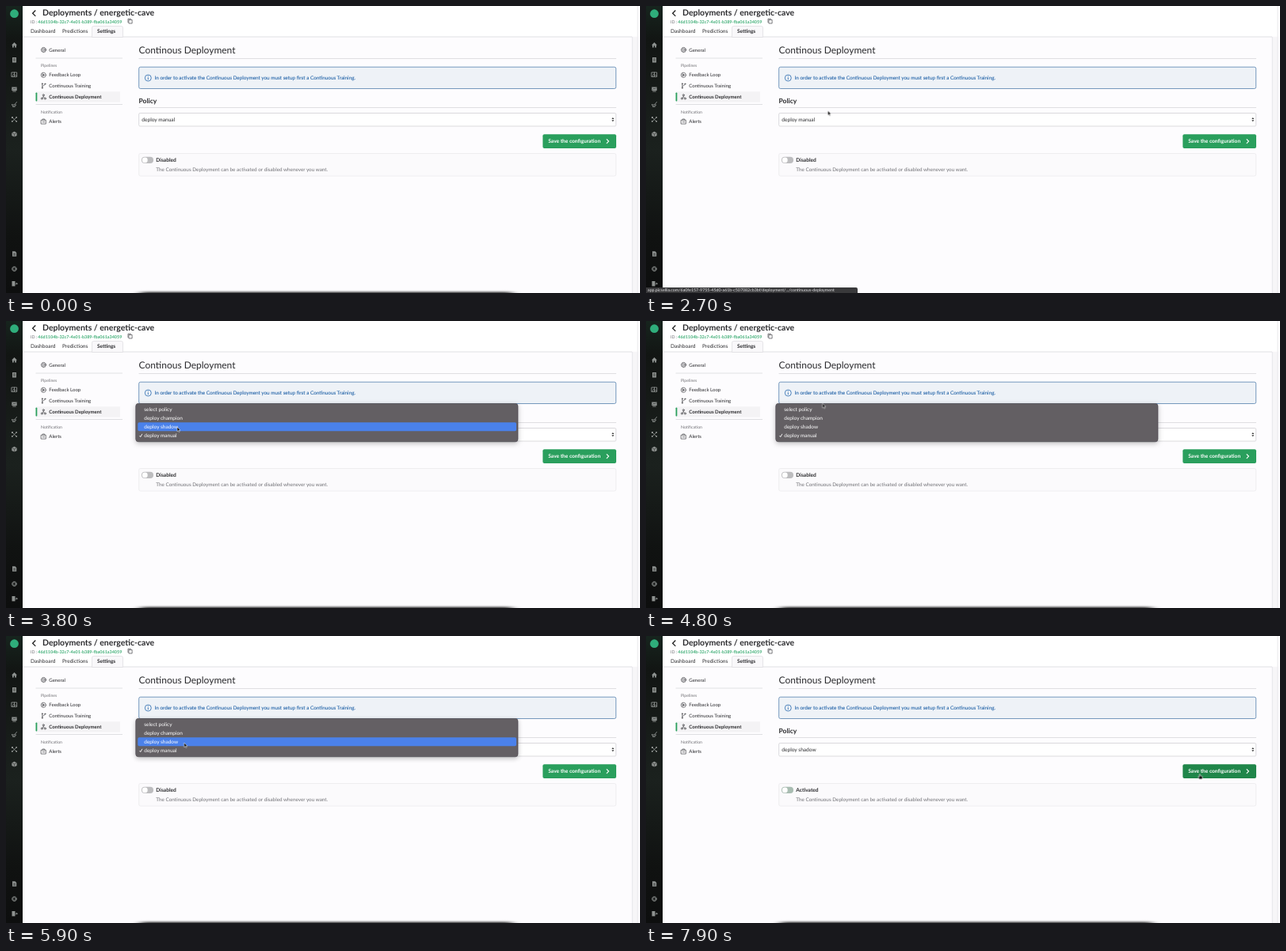
Animation, 800 px wide and 363 px high, one loop 8 s. Source, as an HTML page:

```html
<!DOCTYPE html>
<html lang="en">
<head>
<meta charset="utf-8">
<title>Deployment settings</title>
<style>
html, body { margin: 0; width: 100%; height: 100%; overflow: hidden; background: #fdfcfe; }
svg { display: block; width: 800px; height: 363px; }
text { font-family: Lato, "Open Sans", sans-serif; fill: #2b2b2e; text-rendering: geometricPrecision; white-space: pre; }
.b { font-weight: 700; }
.soft { fill: #707075; }
.rule { stroke: #d9d8db; stroke-width: .8; }
.ico { fill: none; stroke: #5c5c60; stroke-width: .8; stroke-linecap: round; stroke-linejoin: round; }
.side .ico { stroke: #8d918f; stroke-width: .9; }
.side .fill { fill: #8d918f; }
.anim { animation: 8s step-end infinite; }

#cursor { animation: move 8s linear infinite; }
#arrow { animation-name: arrow; }
#hand { animation-name: hand; }
#status { animation-name: status; }
#dock { animation-name: dock; }
#menu { animation: menu 8s linear infinite; }
#pick { animation-name: pick; }
#manual { animation-name: before; }
#shadow { animation-name: after; }
#button { animation-name: hover; }
#off { animation-name: off; }
#on { animation-name: on; }
#track { animation-name: track; }

@keyframes move {
  0%, 6.25% { transform: translate(236px, 176px); }
  10% { transform: translate(200px, 130px); }
  13.75%, 17.5% { transform: translate(159px, 104px); }
  25%, 27.5% { transform: translate(122px, 114px); }
  30% { transform: translate(165px, 119px); }
  33.75% { transform: translate(229.5px, 132.5px); }
  37.5% { transform: translate(218px, 141px); }
  40%, 45% { transform: translate(216px, 143px); }
  47.5%, 50% { transform: translate(216px, 134px); }
  52.5%, 55% { transform: translate(217px, 124px); }
  60%, 62% { transform: translate(222.7px, 104.3px); }
  65% { transform: translate(224px, 121px); }
  67.5%, 80% { transform: translate(224.7px, 135px); }
  85% { transform: translate(440px, 155px); }
  90% { transform: translate(697px, 187px); }
  91.25% { transform: translate(698px, 178px); }
  93%, 100% { transform: translate(698.7px, 174.5px); }
}
@keyframes arrow { 0% { opacity: 0; } 6.25% { opacity: 1; } 91.25%, 100% { opacity: 0; } }
@keyframes hand { 0% { opacity: 0; } 91.25%, 100% { opacity: 1; } }
@keyframes status { 0% { opacity: 0; } 27.5% { opacity: 1; } 36.25%, 100% { opacity: 0; } }
@keyframes dock { 0% { opacity: 1; } 27.5% { opacity: 0; } 36.25%, 100% { opacity: 1; } }
@keyframes menu {
  0%, 39.99% { opacity: 0; }
  40%, 73.75% { opacity: 1; }
  75% { opacity: .45; }
  76.25% { opacity: .02; }
  77.5%, 100% { opacity: 0; }
}
@keyframes pick {
  0% { transform: translateY(33px); opacity: 1; }
  46.25% { transform: translateY(22px); opacity: 1; }
  51.25% { transform: translateY(11px); opacity: 1; }
  55% { transform: none; opacity: 1; }
  58.75% { transform: none; opacity: 0; }
  63.75% { transform: none; opacity: 1; }
  65% { transform: translateY(11px); opacity: 1; }
  66.25% { transform: translateY(22px); opacity: 1; }
  72.5% { transform: translateY(22px); opacity: 0; }
  73.75%, 100% { transform: translateY(22px); opacity: 1; }
}
@keyframes before { 0% { opacity: 1; } 77.5%, 100% { opacity: 0; } }
@keyframes after { 0% { opacity: 0; } 77.5%, 100% { opacity: 1; } }
@keyframes hover { 0% { fill: #2a9f5d; } 91.25%, 100% { fill: #20864a; } }
@keyframes off { 0% { opacity: 1; } 98.75%, 100% { opacity: 0; } }
@keyframes on { 0% { opacity: 0; } 98.75%, 100% { opacity: 1; } }
@keyframes track { 0% { fill: #bdbdbf; } 98.75%, 100% { fill: #a9bdb2; } }
</style>
</head>
<body>
<svg viewBox="0 0 800 363">
  <defs>
    <linearGradient id="dark" x2="0" y2="1">
      <stop offset="0" stop-color="#17241e"/>
      <stop offset=".12" stop-color="#121513"/>
      <stop offset=".5" stop-color="#1b211e"/>
      <stop offset=".8" stop-color="#101211"/>
      <stop offset="1" stop-color="#0d0e0e"/>
    </linearGradient>
    <filter id="blur" x="-10%" y="-200%" width="120%" height="500%"><feGaussianBlur stdDeviation="6 1.6"/></filter>
    <filter id="drop" x="-5%" y="-30%" width="110%" height="170%"><feDropShadow dx="0" dy="2" stdDeviation="3" flood-opacity=".25"/></filter>
  </defs>

  <rect width="800" height="363" fill="#fdfcfe"/>
  <rect x="21" width="779" height="38.5" fill="#fff"/>
  <path class="rule" d="M21 39H790"/>
  <rect x="790" y="39" width="7" height="324" fill="#f7f6f8"/>
  <path d="M790.3 39V363M797 0V363" stroke="#e4e3e6" stroke-width=".8"/>

  <!-- dark side bar -->
  <g class="side">
    <rect width="21" height="363" fill="url(#dark)"/>
    <circle cx="10.5" cy="9.7" r="5.4" fill="#2fae7b"/>
    <path class="fill" d="M7 49.4L10.5 46l3.5 3.4h-1V52.600h-1.800V50.300H9.800v2.300H8v-3.200z"/>
    <path class="fill" d="M8 65h5v6.500H8z"/>
    <path d="M9 67h3M9 69h3" stroke="#1a1d1b" stroke-width=".7"/>
    <path class="ico" d="M7.300 84h6.400v5.500H7.300zM8 88.500l1.700-2 1.500 1.500 1-1 1.300 1.500M10.500 84v5"/>
    <path class="fill" d="M7.300 102.500h6.400v4.500H7.300zM8.300 107.500h4.400v1H8.300z"/>
    <path d="M8.500 105.500l1.500-1.300 1.200.9 1.500-1.500" fill="none" stroke="#1a1d1b" stroke-width=".6"/>
    <path class="ico" d="M13.500 121.500l-2.500 3M7.500 124.500c0 3 4 4 5 1M8 125h4.500M8.500 127.300h2.500"/>
    <path class="ico" d="M8 141l5 5M13 141l-5 5"/>
    <path class="fill" d="M7 140h2v2H7zM12.300 140h1.700v1.700h-1.700zM7 145h1.700v1.700H7zM12.300 145h1.700v1.700h-1.700z"/>
    <path class="fill" d="M10.500 158.800l3.200 1.600v3.600l-3.200 1.600-3.200-1.600v-3.600z"/>
    <path d="M7.500 160.500l3 1.500 3-1.500M10.500 162v3.500" fill="none" stroke="#1a1d1b" stroke-width=".5"/>
    <path class="fill" d="M8 310.300h3.500l1.700 1.700v4.700H8z"/>
    <path d="M9.200 313.300h2.800M9.200 315h2.800" stroke="#111" stroke-width=".6"/>
    <circle class="ico" cx="10.500" cy="332.500" r="1.900"/>
    <circle class="ico" cx="10.500" cy="332.500" r="2.900" stroke-dasharray="1.300 .98"/>
    <path class="fill" d="M7.500 348h4v6.400h-4z"/>
    <path class="ico" d="M12 351.200h2.200m-1-1l1 1-1 1"/>
  </g>

  <!-- header -->
  <path d="M37.300 5.500l-3.700 3.700 3.700 3.700" fill="none" stroke="#222" stroke-width="1.300"/>
  <text class="b" x="46" y="12" font-size="10.500">Deployments / energetic-cave</text>
  <text class="soft" x="31" y="21.500" font-size="5.300">ID :</text>
  <text class="b" x="40.300" y="21.500" font-size="5.450" style="fill:#3fae76">46d1104b-32c7-4e01-b389-fba061a34059</text>
  <path class="ico" d="M155.300 17.500h3.800v4.500h-3.800zM154 20.700v-4.500h3.500" stroke-width=".6"/>
  <path d="M108.500 39.500V27.500q0-2 2-2h35q2 0 2 2v12z" fill="#f9f8fa" stroke="#dddce0" stroke-width=".7"/>
  <g font-size="6.600">
    <text x="31" y="34">Dashboard</text>
    <text x="71" y="34">Predictions</text>
    <text class="b" x="115" y="34" font-size="6.500">Settings</text>
  </g>

  <!-- settings list -->
  <path class="rule" d="M37.500 66H147M37.500 124.500H147"/>
  <rect x="38" y="108.300" width="106" height="13.300" fill="#f4f3f5"/>
  <rect x="37.500" y="109.500" width="1.800" height="11" rx=".7" fill="#2a9f5d"/>
  <g class="ico">
    <circle cx="47.500" cy="55.500" r="1.100"/>
    <circle cx="47.500" cy="55.500" r="2.700"/>
    <circle cx="47.500" cy="55.500" r="3.200" stroke-dasharray="1 1.510" stroke-width=".6"/>
    <circle cx="47.300" cy="87.300" r="3.100"/>
    <path d="M46.500 86l2.200 1.300-2.200 1.300z" fill="#5c5c60"/>
    <path d="M45.800 98.500v5M49.300 99c0 2-3.500 1-3.500 3"/>
    <circle cx="45.800" cy="98.300" r=".6"/><circle cx="49.300" cy="98.500" r=".6"/><circle cx="45.800" cy="103.700" r=".6"/>
    <path d="M47.300 113v2l-2 2M47.300 115l2 2"/>
    <circle cx="47.300" cy="112.700" r="1.100"/><circle cx="45.300" cy="117" r="1.100"/><circle cx="49.300" cy="117" r="1.100"/>
    <path d="M44.500 144.300h5.800v4.800h-5.800zM46 144v-1h2.800v1M46.200 146.700h2.500"/>
  </g>
  <g font-size="6.050">
    <text x="54.300" y="57.600">General</text>
    <text x="54.300" y="89.300">Feedback Loop</text>
    <text x="54.300" y="103">Continuous Training</text>
    <text class="b" x="54.300" y="116.800" font-size="6.100">Continuous Deployment</text>
    <text x="54.300" y="148.300">Alerts</text>
  </g>
  <g font-size="5.200">
    <text class="soft" x="44" y="76.500">Pipelines</text>
    <text class="soft" x="44" y="136">Notification</text>
  </g>

  <!-- main form -->
  <text x="167.500" y="59.700" font-size="12">Continous Deployment</text>
  <path class="rule" d="M167.500 66.500H770M167.500 128.500H770"/>
  <rect x="167.700" y="77.200" width="602" height="27.300" rx="2" fill="#eef2f7" stroke="#5580ae" stroke-width=".8"/>
  <circle cx="179.300" cy="91" r="4" fill="none" stroke="#2d6cb0" stroke-width=".8"/>
  <path d="M179.300 90.300v2.900M179.300 88.300v.9" stroke="#2d6cb0" stroke-width=".9"/>
  <text x="187.500" y="92.900" font-size="6.350" style="fill:#2565a9;stroke:#2565a9;stroke-width:.1">In order to activate the Continuous Deployment you must setup first a Continuous Training.</text>
  <text class="b" x="167.500" y="122.500" font-size="8.500">Policy</text>
  <rect x="167.700" y="135.500" width="602" height="16.500" rx="1.500" fill="#fff" stroke="#d2d1d5" stroke-width=".8"/>
  <path d="M764.300 143.100l1.500-2 1.500 2zM764.300 144.300l1.500 2 1.500-2z" fill="#333"/>
  <text class="anim" id="manual" x="171.300" y="146" font-size="6.600">deploy manual</text>
  <text class="anim" id="shadow" x="171.300" y="146" font-size="6.600">deploy shadow</text>
  <rect class="anim" id="button" x="677.300" y="162.300" width="92.700" height="17.700" rx="2" fill="#2a9f5d"/>
  <text class="b" x="684.300" y="173.300" font-size="6.600" style="fill:#fff">Save the configuration</text>
  <path d="M757.800 168.300l2.700 2.800-2.700 2.800" fill="none" stroke="#fff" stroke-width="1.100"/>
  <rect x="167.700" y="186.500" width="602" height="28.500" rx="2" fill="#fbfafc" stroke="#ebeaed" stroke-width=".8"/>
  <rect class="anim" id="track" x="171" y="190.800" width="15" height="8.200" rx="4.100" fill="#bdbdbf"/>
  <circle cx="175.300" cy="194.900" r="3.400" fill="#fff"/>
  <text class="anim b" id="off" x="189.300" y="197.200" font-size="6.600">Disabled</text>
  <text class="anim b" id="on" x="189.300" y="197.200" font-size="6.600">Activated</text>
  <text class="soft" x="189.300" y="208.800" font-size="6.350">The Continuous Deployment can be activated or disabled whenever you want.</text>

  <!-- overlays -->
  <rect class="anim" id="dock" x="170" y="362" width="468" height="8" fill="#000" opacity=".8" filter="url(#blur)"/>
  <g class="anim" id="status">
    <path d="M0 356H265q2 0 2 2v5H0z" fill="#39393b"/>
    <text x="2" y="361.400" font-size="5.300" style="fill:#e6e6e8">app.picsellia.com/6a0fe157-9755-45d0-a61b-c507082cb3bf/deployment/.../continuous-deployment</text>
  </g>
  <g id="menu">
    <rect x="163.700" y="104.300" width="482.300" height="48.500" rx="3.500" fill="#635e64" stroke="#4c484d" stroke-width=".6" filter="url(#drop)"/>
    <rect class="anim" id="pick" x="166.300" y="106.300" width="477.700" height="10.900" rx="1.800" fill="#4a81ea"/>
    <path d="M168.500 145l1.200 1.600 2.200-3.800" fill="none" stroke="#fff" stroke-width=".9"/>
    <g font-size="6.500" style="--c:#fff">
      <text x="174.300" y="114" style="fill:#fff">select policy</text>
      <text x="174.300" y="125" style="fill:#fff">deploy champion</text>
      <text x="174.300" y="136" style="fill:#fff">deploy shadow</text>
      <text x="174.300" y="147" style="fill:#fff">deploy manual</text>
    </g>
  </g>
  <g id="cursor">
    <path class="anim" id="arrow" d="M0 0V5.700L1.300 4.500 2.200 6.500 3.200 6.100 2.300 4.100H4.100z" fill="#111" stroke="#fff" stroke-width=".5"/>
    <path class="anim" id="hand" d="M-.7 .6Q0-.3 .7.600V2.400L3 3Q3.700 3.200 3.500 4L3 6.500H-.5L-2.300 3.900Q-2.100 2.900-.7 3.900z" fill="#111" stroke="#fff" stroke-width=".6"/>
  </g>
</svg>
</body>
</html>
```
